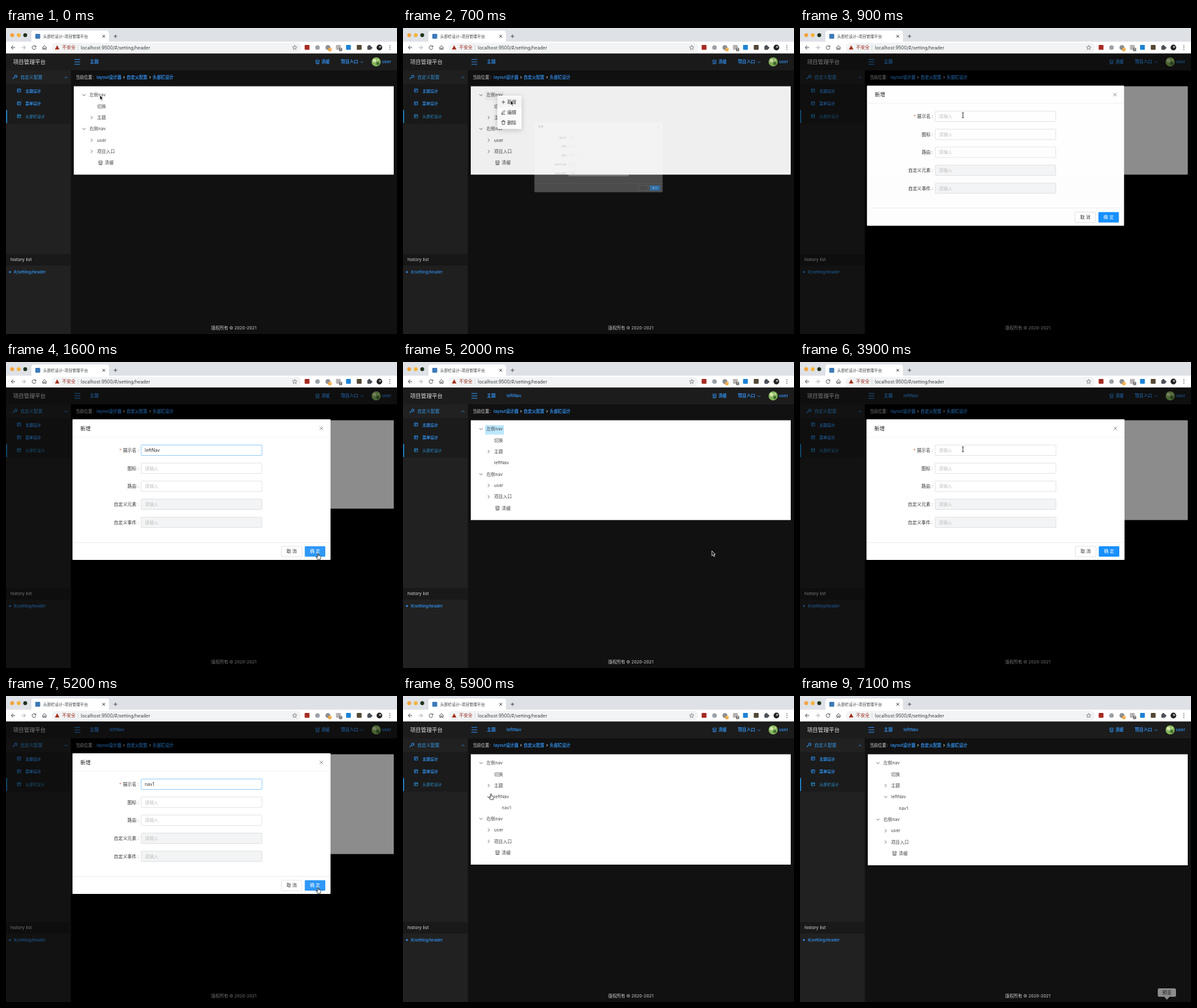
These frames come from a looping animation (600x470 px, 7200 ms). An HTML page with a canvas:

```html
<!DOCTYPE html>
<html lang="zh">
<head>
<meta charset="utf-8">
<title>头部栏设计</title>
<style>
  html, body { margin: 0; width: 600px; height: 470px; overflow: hidden; background: #111; }
  canvas { display: block; }
</style>
</head>
<body>
<canvas id="stage" width="600" height="470"></canvas>
<script>
const c = document.getElementById('stage').getContext('2d');
const LOOP = 7200, ROW = 17.33, BLUE = '#318de9', INK = '#484848';
const FIRST_ADD = 1750, CHILD_ADD = 5350;
const DIALOGS = [
  { open: 670, close: 1680, value: 'leftNav', typeStart: 1000, typeStep: 60 },
  { open: 3118, close: 5260, value: 'nav1', typeStart: 4100, typeStep: 150 }
];
const clamp = v => Math.max(0, Math.min(1, v));
const span = (t, a, b) => clamp((t - a) / (b - a));

function text(s, x, y, size, color, weight = 400, align = 'left') {
  c.font = `${weight} ${size}px Inter, "Noto Sans CJK SC", "Noto Sans CJK", sans-serif`;
  c.textAlign = align;
  c.fillStyle = color;
  c.fillText(s, x, y + size * 0.36);
}
function rect(x, y, w, h, color, r = 0) {
  c.fillStyle = color;
  c.beginPath();
  c.roundRect(x, y, w, h, r);
  c.fill();
}
function frame(x, y, w, h, color, r = 1) {
  c.strokeStyle = color;
  c.lineWidth = 0.7;
  c.beginPath();
  c.roundRect(x, y, w, h, r);
  c.stroke();
}
function disc(x, y, r, color) {
  c.fillStyle = color;
  c.beginPath();
  c.arc(x, y, r, 0, 7);
  c.fill();
}
// Strokes an SVG path placed at x, y
function icon(d, x, y, color, width = 0.8, angle = 0) {
  c.save();
  c.translate(x, y);
  c.rotate(angle);
  c.strokeStyle = color;
  c.lineWidth = width;
  c.stroke(new Path2D(d));
  c.restore();
}
const RIGHT = 'M-1.2-2.3L1.2 0L-1.2 2.3';
const CROSS = 'M-2-2L2 2M2-2L-2 2';
const BIG_CROSS = 'M-2.6-2.6L2.6 2.6M2.6-2.6L-2.6 2.6';
const PLUS = 'M-2.7 0H2.7M0-2.7V2.7';
const TRASH = 'M-3-1.8H3M-1.2-1.8V-3H1.2V-1.8M-2.2-1.8L-1.8 3H1.8L2.2-1.8';
const BROOM = 'M-2.6-2.8H2.6V-.6H-2.6ZM-2-.6L-2.3 3H2.3L2-.6M-.6 1V3M.8 1V3';
const PENCIL = 'M-2.5 2.2L-2 .2L1.4-3L2.7-1.6L-.6 1.6ZM-3 3.2H3';
const WINDOW = 'M-2.6-2.4H2.6V2.4H-2.6ZM-2.6-.9H2.6M-.8-.9V2.4';

function browser() {
  rect(0, 0, 600, 22, '#dee1e6');
  disc(9.5, 11, 3, '#f3a33c');
  disc(19.5, 11, 3, '#f3b53d');
  disc(29.5, 11, 3, '#1f321d');
  rect(39, 4, 119, 20, '#fff', 4);
  rect(45, 9, 7.5, 7.5, '#3d79b8', 1);
  text('头部栏设计-项目管理平台', 57, 13, 6, '#3c4043');
  icon(CROSS, 150, 12.7, '#333', 1);
  icon(PLUS, 168, 12.7, '#444', 0.9);
  rect(0, 21, 600, 18.5, '#fff');
  icon('M3 0H-3M0-3L-3 0L0 3', 11, 30, '#50545a', 1);
  icon('M-3 0H3M0-3L3 0L0 3', 27, 30, '#a9acb1', 1);
  icon('M2.4-1.6A2.9 2.9 0 1 0 2.9 .6M2.9-3V-1H.8', 43, 30, '#50545a', 1);
  icon('M-3.4 .2L0-3L3.4 .2M-2.4-.4V3H-.8V.8H.8V3H2.4V-.4', 59, 30, '#50545a', 0.9);
  rect(70, 23, 383, 14, '#f1f3f4', 7);
  c.fillStyle = '#a8321f';
  c.fill(new Path2D('M78.5 26.6L82 33H75Z'));
  text('不安全', 86, 30, 6.9, '#9b2c1d');
  rect(110.3, 26, 0.6, 8, '#c4c7cb');
  text('localhost:9500/#/setting/header', 115, 30, 6.95, '#3c4043');
  icon('M0-3.4L1-1.1L3.4-.9L1.6 .7L2.1 3.1L0 1.8L-2.1 3.1L-1.6 .7L-3.4-.9L-1-1.1Z', 443, 30, '#5f6368', 0.7);
  [[462, '#a62b22'], [510, '#b8b2b2'], [525.5, '#1c83d6'], [542, '#514733']]
    .forEach(([x, color]) => rect(x - 3.7, 26, 7.4, 7.4, color, 1));
  disc(478, 30, 3.5, '#9aa0a6');
  disc(494, 30, 3.7, '#8b8f94');
  [[497, '#f0a030'], [513.5, '#777']].forEach(([x, color]) => {
    rect(x - 2.5, 30.5, 5, 5, color, 1);
    text('1', x, 33, 4, '#fff', 600, 'center');
  });
  rect(554.5, 27.5, 6, 6, '#4c5056', 1);
  disc(557.5, 27.3, 1.4, '#4c5056');
  disc(560.8, 30.5, 1.4, '#4c5056');
  disc(573, 30, 4.4, '#222');
  disc(574, 29, 1.6, '#b8b8b8');
  [27, 30, 33].forEach(y => disc(589, y, 0.8, '#50545a'));
}

function shell(t) {
  // The backdrop sinks to full black behind an open dialog
  const shade = Math.round(17 * (1 - Math.max(...DIALOGS.map(d => dim(t, d))) ** 3));
  rect(0, 39.5, 600, 431, `rgb(${shade},${shade},${shade})`);
  rect(0, 65, 99.5, 405, '#212121');
  rect(0, 86, 99.5, 61, '#1b1b1b');
  rect(0, 39.5, 600, 25.5, '#1c1c1c');
  text('项目管理平台', 11, 52, 8.3, '#e4e4e4', 500);
  [48.3, 52, 55.7].forEach(y => rect(105, y - 0.5, 9, 1, BLUE));
  text('主题', 128.8, 52, 6.6, BLUE, 600);
  if (t >= FIRST_ADD) text('leftNav', 159, 52, 6.5, BLUE, 600);
  icon(BROOM, 478, 52, BLUE);
  text('清缓', 484, 52, 6.3, BLUE, 600);
  text('项目入口', 514, 52, 6.6, BLUE, 600);
  icon(RIGHT, 546, 52.4, BLUE, 0.8, Math.PI / 2);
  disc(568, 52, 7, '#86b65c');
  disc(565.5, 50, 2.8, '#d4e5ab');
  disc(570.5, 54.5, 2.4, '#426b35');
  disc(571, 49, 1.5, '#c3dc94');
  text('user', 577, 52, 6.5, BLUE, 600);

  icon('M-2.8 2.8L.6-.6M.3-.8A1.8 1.8 0 1 1 1 .2', 13, 75.5, BLUE, 1.1);
  text('自定义配置', 22, 75.5, 6.8, '#3598e4', 500);
  icon(RIGHT, 92, 76, BLUE, 0.8, -Math.PI / 2);
  ['主题设计', '菜单设计', '头部栏设计'].forEach((s, i) => {
    const y = 96.5 + i * 19.7, color = i < 2 ? BLUE : '#2a8fcb';
    icon(WINDOW, 20, y - 0.5, color);
    text(s, 29.8, y, 6, color, i < 2 ? 600 : 500);
  });
  rect(0, 126, 1.7, 20, '#1f86c9');
  rect(0, 347, 99.5, 18, '#191919');
  text('history list', 7, 356, 6.7, '#dedede');
  disc(6, 374.7, 1.5, BLUE);
  text('#/setting/header', 12, 374.5, 6, BLUE, 600);

  text('当前位置：', 107, 75.5, 6.3, '#dedede', 500);
  text('layout设计器', 139, 75.5, 6.4, BLUE, 600);
  text('自定义配置', 185, 75.5, 6.4, BLUE, 600);
  text('头部栏设计', 225, 75.5, 6.4, BLUE, 600);
  [181, 221].forEach(x => text('›', x, 75, 7.5, '#d0d0d0', 600, 'center'));
  text('版权所有 © 2020-2021', 349.5, 460.5, 6.5, '#d2d2d2', 400, 'center');
}

function tree(t) {
  const opened = 1 - (1 - span(t, 5720, 5960)) ** 2;
  // label, depth, arrow angle in quarter turns (or null), height factor
  const rows = [['左侧nav', 0, 1], ['切换', 1, null], ['主题', 1, 0]];
  if (t >= FIRST_ADD) rows.push(['leftNav', 1, t >= CHILD_ADD ? opened : null]);
  if (opened) rows.push(['nav1', 2, null, opened]);
  rows.push(['右侧nav', 0, 1], ['user', 1, 0], ['项目入口', 1, 0], ['清缓', 2, null]);

  const total = rows.reduce((sum, r) => sum + (r[3] ?? 1), 0);
  rect(104, 89.5, 491, 14.5 + total * ROW, '#fff');
  if (t >= FIRST_ADD && t < 2400) rect(126, 97, 29, 14.5, '#bae7ff', 1);
  if (t >= 250 && t < 800) rect(126, 97, 29, 14.5, '#f5f5f5', 1);
  if (t >= 2500 && t < 3400) rect(137.5, 148.5, 27, 14, '#f0f0f0', 1);
  if (t >= CHILD_ADD && t < 5700) rect(137.5, 148.5, 27, 14, '#bae7ff', 1);

  let y = 103;
  for (const [label, depth, arrow, grow = 1] of rows) {
    const x = 128 + depth * 11.8, rowY = y - (1 - grow) * ROW;
    c.globalAlpha = grow;
    if (arrow !== null) icon(RIGHT, x - 8.3, rowY, '#444', 0.75, arrow * Math.PI / 2);
    if (label === '清缓') icon(BROOM, 145, rowY, INK, 0.75);
    text(label, x, rowY, 6.8, INK);
    c.globalAlpha = 1;
    y = rowY + ROW;
  }
}

function dim(t, { open, close }) {
  return span(t, open, open + 220) * (1 - span(t, close, close + 180));
}

function dialog(t, d) {
  const { open, close, value, typeStart, typeStep } = d;
  const p = span(t, open, open + 350), q = span(t, close, close + 180);
  if (!p || q === 1) return;
  const e = (1 - (1 - p) ** 5) * (1 - q * q), alpha = e ** 1.4;
  c.fillStyle = `rgba(0,0,0,${0.45 * dim(t, d)})`;
  c.fillRect(0, 39.5, 600, 431);

  c.save();
  c.globalAlpha = alpha;
  c.translate(300, 201);
  c.scale(0.2 + 0.8 * e, 0.2 + 0.8 * e);
  c.translate(-300, -201);
  rect(102, 88, 396, 216, '#fff', 1);
  text('新增', 114, 102, 8, '#222', 500);
  icon(BIG_CROSS, 484, 102, '#777', 0.8);
  rect(102, 115, 396, 0.6, '#ededed');
  rect(102, 276.8, 396, 0.6, '#e6e6e6');

  const typed = value.slice(0, Math.max(0, Math.floor((t - typeStart) / typeStep)));
  ['展示名', '图标', '路由', '自定义元素', '自定义事件'].forEach((s, i) => {
    const y = 135.5 + i * 27.7, focused = i === 0 && t >= typeStart;
    text(s + ' :', 204, y, 6.9, '#333', 400, 'right');
    if (i > 2) rect(207.3, y - 8, 185.5, 16, '#f3f4f5', 1);
    frame(207.3, y - 8, 185.5, 16, focused ? '#6bb8f8' : '#d9d9d9');
    const filled = i === 0 && typed;
    text(filled ? typed : '请输入', 213, y, 6.9, filled ? '#333' : '#bfbfbf');
  });
  text('*', 175.5, 136.5, 7, '#d9694f', 400, 'center');
  frame(422.5, 283, 31.5, 16, '#d9d9d9');
  text('取 消', 438.3, 291, 6.9, '#333', 400, 'center');
  c.globalAlpha = Math.sqrt(alpha);
  rect(458.5, 283, 31.5, 16, t > close - 250 ? '#2f98f8' : '#1890ff', 1);
  text('确 定', 474.3, 291, 6.9, '#fff', 400, 'center');
  c.restore();
}

function menu(t, start, end, x, y) {
  const alpha = Math.min(span(t, start, start + 100), 1 - span(t, end, end + 150));
  if (!alpha) return;
  c.save();
  c.globalAlpha = alpha;
  c.shadowColor = 'rgba(0,0,0,.2)';
  c.shadowBlur = 9;
  c.shadowOffsetY = 2;
  rect(x, y, 37, 51, '#fff', 1);
  c.shadowColor = 'transparent';
  if (t > start + 200) rect(x, y + 2, 37, 15.5, '#f5f5f5');
  [[PLUS, '新增'], [PENCIL, '编辑'], [TRASH, '删除']].forEach(([d, s], i) => {
    const rowY = y + 9.8 + i * 15.7;
    icon(d, x + 9, rowY, '#333');
    text(s, x + 15, rowY, 6.9, '#222');
  });
  c.restore();
}

const POINTERS = {
  arrow: new Path2D('M0 0V7.6L1.7 6L3 8.8L4.3 8.2L3 5.5H5.3Z'),
  hand: new Path2D('M-.8 .6Q0-.6 .8 .6V3.4L3.6 4Q4.4 4.3 4.2 5.4L3.4 9H-1L-3.3 5.8Q-3.2 4.5-2 5.2L-.8 6.2Z'),
  beam: new Path2D('M-1.5-4Q0-4 0-3V3Q0 4-1.5 4M1.5-4Q0-4 0-3M0 3Q0 4 1.5 4')
};
const STOPS = [
  [0, 144, 103, 'arrow'], [350, 144, 103, 'arrow'], [500, 165, 111, 'hand'],
  [700, 165, 111, 'arrow'], [850, 250, 134, 'beam'], [1450, 250, 134, 'arrow'],
  [1600, 479, 294, 'hand'], [1750, 479, 294, 'arrow'], [2000, 474, 290, 'arrow'],
  [2200, 474, 290, 'arrow'], [2500, 148, 154, 'arrow'], [2850, 148, 154, 'arrow'],
  [3000, 169, 162, 'hand'], [3300, 169, 162, 'arrow'], [3600, 250, 134, 'beam'],
  [4800, 250, 134, 'arrow'], [5050, 479, 294, 'hand'], [5350, 479, 294, 'arrow'],
  [5650, 135, 150, 'hand'], [6300, 135, 150, 'arrow'], [6900, 563, 472, 'arrow'],
  [LOOP, 563, 472, 'arrow']
];
function pointer(t) {
  const i = STOPS.findIndex(s => s[0] > t);
  const [t0, x0, y0, kind] = STOPS[i - 1], [t1, x1, y1] = STOPS[i];
  const p = span(t, t0, t1), e = p * p * (3 - 2 * p);
  c.save();
  c.translate(x0 + (x1 - x0) * e, y0 + (y1 - y0) * e);
  c.lineJoin = 'round';
  if (kind === 'beam') {
    c.strokeStyle = '#222';
    c.lineWidth = 0.9;
  } else {
    c.strokeStyle = kind === 'hand' ? '#222' : '#eee';
    c.fillStyle = kind === 'hand' ? '#fff' : '#111';
    c.lineWidth = 0.8;
    c.fill(POINTERS[kind]);
  }
  c.stroke(POINTERS[kind]);
  c.restore();
}

function dockLabel() {
  rect(549, 449, 28, 13, '#8c8c8c', 2.5);
  c.fill(new Path2D('M558.5 461.5H567.5L563 466.5Z'));
  text('预览', 563, 455.5, 7, '#161616', 400, 'center');
}

function draw(t) {
  browser();
  shell(t);
  tree(t);
  DIALOGS.forEach(d => dialog(t, d));
  menu(t, 200, 690, 145, 104);
  menu(t, 2650, 3190, 149, 155);
  if (t >= 6850) dockLabel();
  pointer(t);
}

const start = performance.now();
function tick() {
  draw((performance.now() - start) % LOOP);
  requestAnimationFrame(tick);
}
tick();
</script>
</body>
</html>
```
